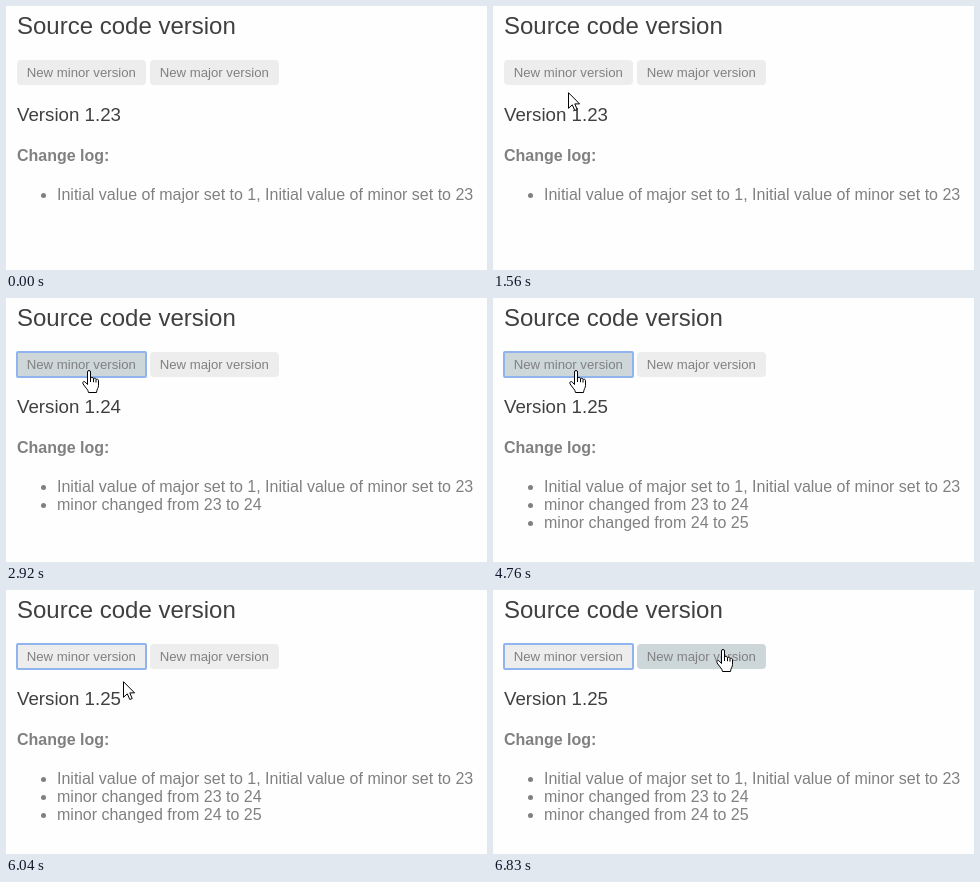
Write an HTML page that moves like this. It is 481x264 px and loops after 8000 ms.

```html
<!DOCTYPE html>
<html lang="en">
<head>
<meta charset="utf-8">
<title>Source code version</title>
<style>
html, body { margin: 0; width: 100%; height: 100%; overflow: hidden; background: #fefefe; }
svg { display: block; width: 481px; height: 264px; font: 16px "Liberation Sans", Arial, sans-serif; fill: #808080; }
.dark { fill: #404040; }
.label { font-size: 13.2px; }
.button { fill: #ededed; }
.button.hover { fill: #cdd7d9; }
.cursor { fill: #fff; stroke: #000; stroke-linejoin: round; }
.hidden { visibility: hidden; }
</style>
</head>
<body>
<svg viewBox="0 0 481 264">
  <text class="dark" x="11" y="28" font-size="24">Source code version</text>

  <rect id="minor" class="button" x="11" y="54" width="129" height="25" rx="4"/>
  <rect id="major" class="button" x="144" y="54" width="129" height="25" rx="4"/>
  <rect id="focus" x="11" y="54" width="129" height="25" rx="1" fill="none" stroke="#8fb4ee" stroke-width="2"/>
  <text class="label" x="20.7" y="71">New minor version</text>
  <text class="label" x="153.7" y="71">New major version</text>

  <text id="version" class="dark" x="11" y="115" font-size="18.72">Version 1.23</text>
  <text x="11" y="155" font-weight="bold">Change log:</text>
  <g id="log"></g>

  <g id="arrow" class="cursor">
    <path d="M.5 .7V16.3L4.3 12.8L6.8 18.5L9.2 17.5L6.8 11.9H11.6Z"/>
  </g>
  <g id="beam" class="cursor">
    <path fill="none" d="M0 .5H2.5L3.5 1.5L4.5 .5H7M3.5 1.5V14.5M0 15.5H2.5L3.5 14.5L4.5 15.5H7"/>
  </g>
  <g id="hand" class="cursor">
    <path d="M5.5 14.5V2a1.5 1.5 0 0 1 3 0V8.2C9 6.9 11.5 7 11.5 8.9C12 7.8 14 8 14 9.7C14.6 8.8 16.5 9 16.5 10.8V15.5C16.5 18 14.8 19 14.5 22.5H6.5C6.3 19.5 2.7 17 1 13.8C.2 12 2 10.8 3.3 12.1Z"/>
    <path fill="none" d="M8.5 8V12M11.5 9V12.2M14 10V12.6"/>
  </g>
</svg>
<script>
const LOOP = 8000;
const $ = id => document.getElementById(id);

// time, cursor, x, y, hovered button
const moves = [
  [0, "", 0, 0, ""],
  [1250, "arrow", -1, 143, ""],
  [1410, "beam", 40, 101, ""],
  [1560, "arrow", 75, 86, ""],
  [1680, "hand", 75, 78, "minor"],
  [1830, "hand", 76, 72, "minor"],
  [5910, "arrow", 96, 79, "minor"],
  [6040, "arrow", 117, 91, ""],
  [6180, "arrow", 147, 98, ""],
  [6300, "arrow", 174, 100, ""],
  [6430, "arrow", 192, 96, ""],
  [6580, "arrow", 211, 87, ""],
  [6700, "hand", 218, 70, "major"],
  [6830, "hand", 223, 59, "major"]
];

const entries = [
  [0, "Initial value of major set to 1, Initial value of minor set to 23"],
  [2920, "minor changed from 23 to 24"],
  [4760, "minor changed from 24 to 25"]
];

$("log").innerHTML = entries.map(([, text], i) => {
  const y = 194 + 18 * i;
  return `<g><circle cx="37.5" cy="${y - 4.5}" r="2.5"/><text x="51" y="${y}">${text}</text></g>`;
}).join("");
const rows = [...$("log").children];

const show = (el, on) => el.classList.toggle("hidden", !on);

function draw(t) {
  const [, cursor, x, y, hover] = moves.findLast(m => m[0] <= t);
  for (const id of ["arrow", "beam", "hand"]) {
    show($(id), id === cursor);
    $(id).setAttribute("transform", `translate(${x} ${y})`);
  }
  for (const id of ["minor", "major"]) $(id).classList.toggle("hover", id === hover);

  const count = entries.filter(e => e[0] <= t).length;
  rows.forEach((row, i) => show(row, i < count));
  show($("focus"), count > 1);
  $("version").textContent = "Version 1." + (22 + count);
}

const start = performance.now();
function tick() {
  draw((performance.now() - start) % LOOP);
  requestAnimationFrame(tick);
}
tick();
</script>
</body>
</html>
```
